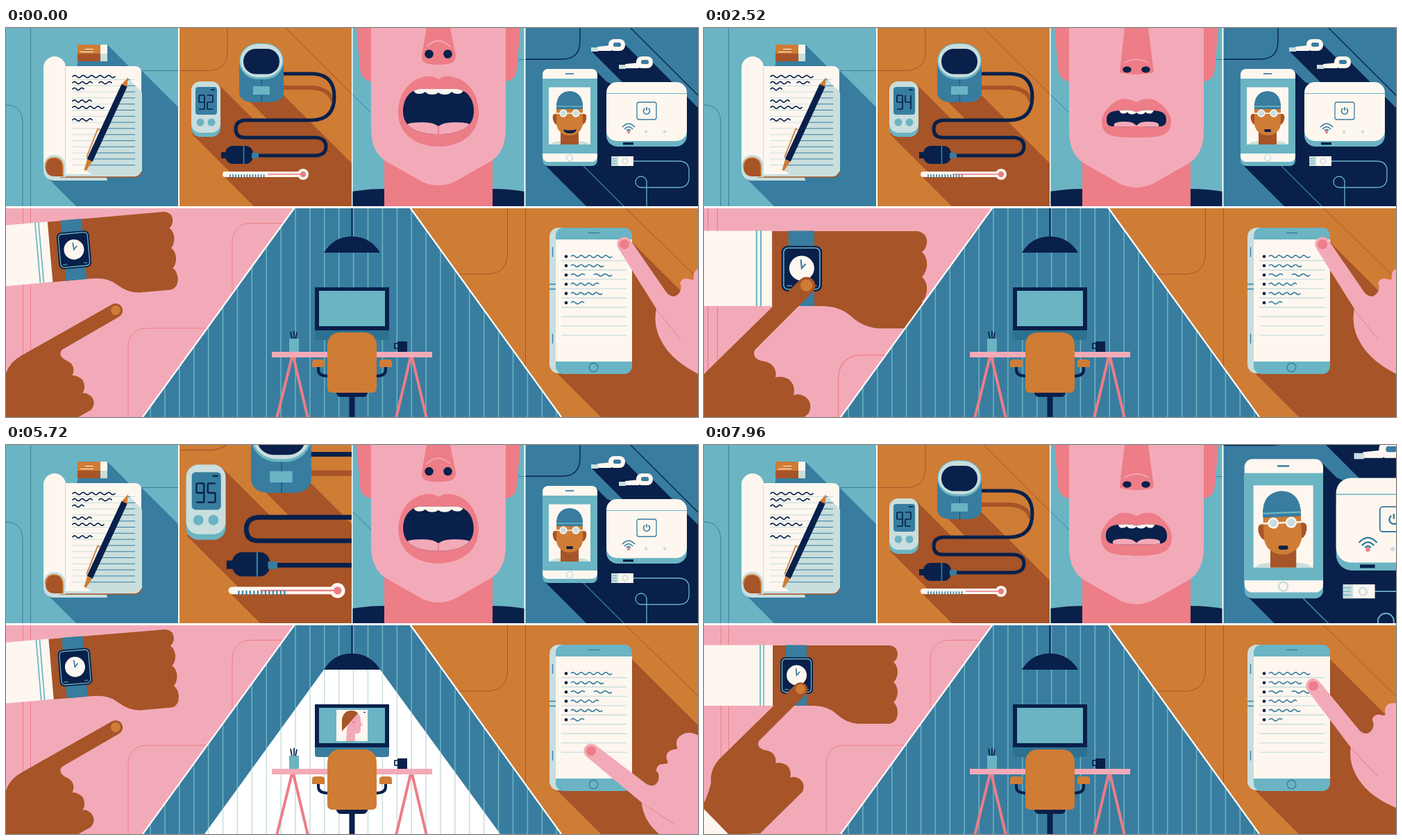
An HTML page that plays this animation: 997x561 px, repeating every 8000 ms.

```html
<!DOCTYPE html>
<html lang="en">
<head>
<meta charset="utf-8">
<title>Health panels</title>
<style>
html,body{margin:0;width:100%;height:100%;overflow:hidden;background:#fff}
svg{display:block;width:100vw;height:100vh}
.navy{fill:#08204a}.teal{fill:#6bb4c3}.blue{fill:#387d9f}.orange{fill:#cf7c35}.brown{fill:#a65428}
.pink{fill:#f3aab8}.rose{fill:#ed7d87}.cream{fill:#fdf7f0}.pale{fill:#c9dedd}
.line{fill:none;stroke-width:1}
.s-navy{stroke:#08204a}.s-teal{stroke:#6bb4c3}.s-blue{stroke:#387d9f}.s-brown{stroke:#a65428}
.s-orange{stroke:#cf7c35}.s-rose{stroke:#ed7d87}.s-pale{stroke:#c9dedd}.s-cream{stroke:#fdf7f0}.s-pink{stroke:#f3aab8}
.round{stroke-linecap:round;stroke-linejoin:round}
.w2{stroke-width:1.7}
</style>
</head>
<body>
<svg viewBox="0 0 997 561" preserveAspectRatio="none">
<defs>
  <clipPath id="c1"><path d="M0 0H248V257H0Z"/></clipPath>
  <clipPath id="c2"><path d="M250 0H498V257H250Z"/></clipPath>
  <clipPath id="c3"><path d="M499.500 0H746.500V257H499.500Z"/></clipPath>
  <clipPath id="c4"><path d="M748.500 0H997V257H748.500Z"/></clipPath>
  <clipPath id="c5"><path d="M0 260H416L197 561H0Z"/></clipPath>
  <clipPath id="c6"><path d="M416 260H582L800 561H197Z"/></clipPath>
  <clipPath id="c7"><path d="M582 260H997V561H800Z"/></clipPath>
  <clipPath id="penShade"><path id="penShadePath" d="M176 72L196 93V206L190 213H126L113 204Z"/></clipPath>
  <clipPath id="cone"><path d="M458 324H539L712 561H286Z"/></clipPath>
  <clipPath id="screen"><path d="M792 305H902V481H792Z"/></clipPath>
  <clipPath id="mouthClip"><path id="mouthClipPath"/></clipPath>
  <g id="bud">
    <path class="cream" d="M852 27L872 25V33H852Z"/><path class="pale" d="M843 28H853V34H843Z"/>
    <rect class="cream" x="868" y="16" width="24" height="17" rx="8"/>
    <rect class="blue" x="875" y="21" width="11" height="6" rx="2.500"/>
  </g>
</defs>

<!-- notepad -->
<g clip-path="url(#c1)">
  <path class="teal" d="M0 0H248V257H0Z"/>
  <path class="line s-blue" d="M35.500 0V257M0 111Q24 111 24 137V257M190 61.500H248"/>
  <path class="blue" d="M104 48L146 24L178 56L195 61L248 114V257H101L60 216Z"/>
  <path class="pale" d="M54 198H140L146 220H68Q54 218 54 204Z"/>
  <path class="pale" d="M86 60H195V204Q195 215 184 215H80Z"/>
  <path class="cream" d="M54 57A16 16 0 0 1 86 57V214H70L54 200Z"/>
  <path class="cream" d="M86 55H187Q195 56 195 65V202Q195 210 187 211H86Z"/>
  <path class="line s-pale" d="M85.500 57V212"/>
  <path class="line s-brown w2" d="M78 215H186Q195 214 195 205"/>
  <path class="pale" d="M54 202Q54 183 70 183Q86 184 86 202V215H70Q55 215 54 202Z"/>
  <path class="brown" d="M57 202Q57 187 70 187Q82 188 82 202V214H70Q58 214 57 202Z"/>
  <path class="line s-orange w2" d="M57 201Q57 187 70 187Q82 188 82 202V214"/>
  <path id="padLines" class="line s-pale"/>
  <use href="#penShadePath" class="pale"/>
  <g clip-path="url(#penShade)"><path id="padLinesDark" class="line s-blue"/></g>
  <path id="padText" class="line s-navy w2 round"/>
  <g transform="translate(176 71) rotate(24.800)">
    <path class="orange" d="M0 0L4.500 14H-4.500Z"/><path class="navy" d="M-4.500 13H4.500V132H-4.500Z"/>
    <path class="orange" d="M-4 132H4L1.500 148H-1.500Z"/>
    <path class="line s-orange w2" d="M-4.500 86H-8.500L-6 130"/>
  </g>
  <path class="orange" d="M103 24H136V37H103Z"/><path class="brown" d="M103 37H136V48H103Z"/>
  <path class="cream" d="M136 24H146V37H136Z"/><path class="pale" d="M136 37H146V48H136Z"/>
  <path class="line s-cream" d="M114 30.500H126M107 34.500H126"/>
</g>

<!-- medical devices -->
<g clip-path="url(#c2)"><path class="orange" d="M250 0H498V257H250Z"/>
<g id="cam2">
  <path class="line s-brown" d="M230 61.500H291Q319 61 319 33V-40M403 0L498 95"/>
  <path class="brown" d="M268 153L305 80L358 133H378L347 102L400 97L510 207V270H370L312 212L325 210Z"/>
  <path class="line s-brown" style="stroke-width:6" d="M400 86H442Q466 88 471 106"/>
  <path class="line s-navy" style="stroke-width:5" d="M399 66H443Q473 68 473 99Q473 132 441 133H344Q331 134 331 145.500Q331 158 344 158H446Q461 159 461 171Q461 183 446 184H362"/>
  <rect class="teal" x="267" y="84" width="42" height="73" rx="13"/>
  <rect class="pale" x="267" y="77" width="42" height="74" rx="13"/>
  <rect class="blue" x="273" y="85" width="31" height="40" rx="4"/>
  <path class="line s-navy w2" d="M295 89H301"/>
  <path id="digits" class="line s-navy w2"/>
  <circle class="teal" cx="280" cy="136" r="5.500"/><circle class="teal" cx="296" cy="136" r="5.500"/>
  <path class="blue" d="M336 45V94Q338 106 354 107H382Q398 106 400 94V45Z"/>
  <rect class="teal" x="336" y="22" width="64" height="52" rx="27"/>
  <rect class="pale" x="337.500" y="23" width="61" height="48" rx="26"/>
  <rect class="navy" x="342" y="30" width="52" height="36.500" rx="18"/>
  <path class="line s-navy" d="M368.500 74V107" opacity=".5"/>
  <path class="teal" d="M356 84H380V96H356Z"/>
  <path class="navy" d="M310 179H318V188H310Z"/><rect class="navy" x="316" y="170" width="40" height="26" rx="11"/>
  <path class="blue" d="M354 180H364V188H354Z"/><path class="line s-blue w2" d="M342.500 170V196"/>
  <path class="line s-cream round" style="stroke-width:8" d="M316 211H428"/>
  <circle class="cream" cx="428" cy="211" r="8"/>
  <path id="mercury" class="line s-rose w2"/><circle class="rose" cx="428" cy="211" r="4.200"/>
  <path id="ticks" class="line s-blue" style="stroke-width:1.600"/>
</g></g>

<!-- face -->
<g clip-path="url(#c3)">
  <path class="teal" d="M498 0H748V257H498Z"/>
  <path class="line s-blue" d="M499 96L527 123M738 45.500H748"/>
  <path class="navy" d="M498 236Q520 232 546 232H701Q726 232 748 236V257H498Z"/>
  <path class="rose" d="M545 170H701V257H545Z"/>
  <path class="rose" d="M505 0L510 58Q511 75 526 77H720Q735 75 736 58L741 0Z"/>
  <path id="jaw" class="pink"/>
  <path id="nose" class="rose"/>
  <path id="bridge" class="line s-pink w2"/>
  <ellipse id="nostrilL" class="navy" cx="609.500" rx="6.300"/><ellipse id="nostrilR" class="navy" cx="636.500" rx="6.300"/>
  <path id="lips" class="rose"/><path id="inner" class="navy"/>
  <g clip-path="url(#mouthClip)">
    <g id="tongue"><path class="pink" d="M-46 45V4Q-44 0 -22 0Q-6 0 0 6Q6 0 22 0Q44 0 46 4V45Z"/><path class="line s-rose w2" d="M0 5V20"/></g>
    <path id="teeth" class="cream" d="M-36 -5H36V2Q34 7 28 7Q22 7 19 4Q16 8 9 8Q3 8 0 5Q-3 8 -9 8Q-16 8 -19 4Q-22 7 -28 7Q-34 7 -36 2Z"/>
  </g>
</g>

<!-- connected gadgets -->
<g clip-path="url(#c4)"><path class="blue" d="M748 0H997V257H748Z"/>
<g id="cam4">
  <path class="line s-navy" style="stroke-width:1.300" d="M740 45H801Q827 45 827 19V-40M900 0L1010 110"/>
  <path class="navy" d="M776 197L850 62L866 78L902 92L843 33L892 24L911 43L932 50L1010 128V270H849Z"/>
  <path class="line s-blue" style="stroke-width:1.300" d="M832 199L890 257"/>
  <path class="line s-teal" style="stroke-width:1.300" d="M904 192H969Q984 192 984 206V216Q984 230 969 230H915A8 8 0 1 1 923 222V270"/>
  <use href="#bud"/><use href="#bud" x="40" y="25"/>
  <rect class="teal" x="773" y="68" width="79" height="131" rx="8"/>
  <rect class="cream" x="773" y="59" width="79" height="134" rx="8"/>
  <path class="teal" d="M773 73H852V181H773Z"/><path class="cream" d="M782 85.500H842V168H782Z"/>
  <path class="line s-blue w2" d="M806 66H818"/><circle class="line s-pale w2" cx="812" cy="187" r="4.500"/>
  <path class="pale" d="M784 168Q786 164 800 163H825Q839 164 840 168Z"/>
  <path class="brown" d="M799 145H825V168H799Z"/>
  <g id="head">
    <path class="brown" d="M794 124Q786 122 788 132Q790 140 796 140ZM830 124Q838 122 836 132Q834 140 828 140Z"/>
    <path class="orange" d="M793 110H831V139Q828 154 812 155Q796 154 793 139Z"/>
    <path class="blue" d="M793 117V110Q795 92 812 91Q829 92 831 110V117Z"/>
    <path class="line s-teal w2" d="M793 113H831"/>
    <path class="line s-cream w2" d="M793 123H831"/>
    <circle class="pale s-cream w2" cx="803" cy="123" r="4.800"/><circle class="pale s-cream w2" cx="821" cy="123" r="4.800"/>
    <path id="portraitMouth" class="navy"/>
  </g>
  <rect class="teal" x="865" y="88" width="116" height="83" rx="16"/>
  <rect class="cream" x="865" y="78" width="116" height="85" rx="15"/>
  <path class="line s-teal" d="M865 94.500H981"/>
  <rect class="line s-blue" style="stroke-width:1.300" x="909" y="107" width="28" height="25" rx="3"/>
  <path class="line s-blue w2" d="M920.500 116A4.500 4.500 0 1 0 925.500 116M923 114V119"/>
  <path class="line s-blue w2" d="M888 143Q897 133 906 143M891 146Q897 139 903 146M894 148Q897 145 900 148"/>
  <circle class="rose" cx="897" cy="150" r="2.200"/><circle class="pale" cx="922" cy="149.500" r="2.200"/><circle class="pale" cx="949" cy="149.500" r="2.200"/>
  <path class="navy" d="M889 165H904V168.500H889Z"/>
  <path class="cream" d="M872 185H904V199H872Z"/><path class="pale" d="M872 185H882V199H872Z"/>
  <path class="line s-teal" d="M872 188.500H880M872 192H880M872 195.500H880"/><circle class="line s-pale w2" cx="892" cy="192" r="3.800"/>
</g></g>

<!-- watch -->
<g clip-path="url(#c5)"><path class="pink" d="M0 259H420V561H0Z"/>
<g id="cam5">
  <path class="line s-rose" d="M24.500 240V570M35.500 240V570M420 281.500H356Q326 281 326 311V460M176 570V462Q176 433 205 433H330"/>
  <g id="arm">
    <path class="brown" d="M90 289H268Q279 291 279 302Q278 310 273 313Q279 318 279 328Q278 338 273 342Q279 347 279 357Q278 367 273 371Q279 376 279 387Q278 400 268 402H222Q205 401 191 388Q178 376 156 376H90Z"/>
    <path class="cream" d="M-80 288.500H99V376H-80Z"/><path class="line s-teal w2" d="M81 288V376M86 288V376"/>
    <path class="blue" d="M118 288.500H148V376H118Z"/>
    <rect class="navy" x="110" y="306" width="47" height="53" rx="7"/>
    <rect class="line s-teal" style="stroke-width:1.300" x="112.500" y="308.500" width="42" height="48" rx="5"/>
    <path class="line s-teal" d="M116 352.500H122M146 352.500H151"/>
    <circle class="cream" cx="133.500" cy="332" r="14.500"/><path class="line s-blue w2" d="M132.500 322L133.500 332L138 327"/>
  </g>
  <g id="pointer">
    <path class="cream" d="M-5 520L37 563L-40 640L-90 580Z"/>
    <path class="brown" d="M132 345L25 450Q8 466 10 488Q6 505 -3 522L37 563L80 561L142 500Q147 488 137 481Q129 477 124 480Q127 468 118 461Q110 457 103 459Q105 449 97 443Q91 440 87 440Q75 436 79 427L146 360A10 10 0 0 0 132 345ZM37 562L80 560L60 600Z"/>
    <circle class="orange" cx="139" cy="352" r="7"/>
  </g>
</g></g>

<!-- desk -->
<g clip-path="url(#c6)">
  <path class="blue" d="M190 259H810V561H190Z"/>
  <path id="stripes" class="line s-teal" style="stroke-width:1.500"/>
  <g id="light" clip-path="url(#cone)"><path fill="#fff" d="M280 320H720V561H280Z"/><path id="litStripes" class="line s-pale" style="stroke-width:1.500"/></g>
  <path class="navy" d="M497.500 259H499.500V302H497.500ZM458 324Q472 301 498 300.500Q525 301 539 324Z"/>
  <path id="stand" d="M445 432H552V446Q552 450 548 450H449Q445 450 445 446Z"/>
  <path class="navy" d="M445 374H552V436H445Z"/><path class="teal" d="M451 379H546V430H451Z"/>
  <g id="profile">
    <path class="cream" d="M476 382H521V427H476Z"/>
    <path class="pink" d="M492 398L505 385Q511 389 511 398L514 405H511V413Q509 417 503 416V427H490Z"/>
    <path class="brown" d="M484 413V396Q486 383 498 383Q504 383 507 387Z"/>
    <circle class="rose" cx="501" cy="400" r="1.800"/><path class="line s-navy" d="M515 385.500H518"/>
  </g>
  <path class="line s-rose" style="stroke-width:4" d="M412 474L390 563M414 474L435 563M583 474L562 563M585 474L606 563"/>
  <path class="pink" d="M383 467H614V475H383Z"/>
  <path class="line s-navy w2" d="M412 449L410 438M415 449V437M417 449L419 439"/><path class="teal" d="M408 448H422V467H408Z"/>
  <path class="navy" d="M564 452H578V467H564Z"/><path class="line s-navy w2" d="M565 455H560V462H565"/>
  <path class="line s-navy" style="stroke-width:4" d="M450 487V493Q450 502 464 502M547 487V493Q547 502 533 502"/>
  <path class="navy" d="M476 524H521V527Q519 532 515 532H482Q478 532 476 527ZM494.500 530H502.500V561H494.500Z"/>
  <path class="orange" d="M463 459Q463 439 483 439H514Q534 439 534 459V519Q534 526 527 526H470Q463 526 463 519ZM441 482Q441 478 446 478H454Q459 478 459 482V489H441ZM538 482Q538 478 543 478H551Q556 478 556 482V489H538Z"/>
</g>

<!-- phone list -->
<g clip-path="url(#c7)">
  <path class="orange" d="M580 259H997V561H580Z"/>
  <path class="line s-brown" d="M722.500 259V325Q722 355 692 355H640M748.500 259V490M893 260L997 362"/>
  <path class="brown" d="M788 492L898 305L997 404V561H857Z"/>
  <rect class="pale" x="783" y="288" width="60" height="210" rx="13"/>
  <rect class="teal" x="792" y="288" width="110" height="211" rx="11"/>
  <path class="cream" d="M792 305H902V481H792Z"/>
  <path class="line s-blue" style="stroke-width:1.400" d="M839 295.500H855M787.500 316V330M787.500 441V455M783 369.500H792M783 376.500H792"/>
  <circle class="line s-blue" style="stroke-width:1.400" cx="846.500" cy="489.500" r="6.300"/>
  <g clip-path="url(#screen)"><g id="oldPage"></g><g id="newPage"></g></g>
  <g id="swiper">
    <path class="pink" d="M899 305L952 382Q962 392 970 382Q975 374 971 368Q975 359 984 362Q990 364 991 362Q989 350 998 347Q1006 346 1010 348Q1010 334 1020 331Q1032 327 1042 336L1140 420V620L1010 505Q965 485 948 458Q931 432 937 405L883 319A10.500 10.500 0 0 1 899 305Z"/>
    <path class="line s-rose" d="M938 407L972 450"/><circle class="rose" cx="891" cy="312" r="7"/>
  </g>
</g>
<path fill="none" stroke="#fff" stroke-width="2.200" d="M416.500 258L197 561M581.500 258L800 561"/>
</svg>
<script>
const $ = id => document.getElementById(id);
const set = (id, name, value) => $(id).setAttribute(name, value);
const clamp = v => Math.min(1, Math.max(0, v));
const mix = (a, b, k) => a + (b - a) * k;
const cubic = k => k < .5 ? 4 * k ** 3 : 1 - 4 * (1 - k) ** 3;
const sine = k => (1 - Math.cos(Math.PI * k)) / 2;
const ramp = (t, a, b, ease = cubic) => ease(clamp((t - a) / (b - a)));
const range = n => [...Array(n).keys()];

// piecewise linear track of [time, value] pairs
function track(t, ...keys) {
  const i = keys.findIndex(k => k[0] > t);
  if (i < 0) return keys[keys.length - 1][1];
  if (!i) return keys[0][1];
  const [a, b] = [keys[i - 1], keys[i]];
  return mix(a[1], b[1], (t - a[0]) / (b[0] - a[0]));
}

// wavy handwriting of width w, about 6 px per half wave
function wave(x, y, w) {
  const count = Math.max(2, Math.round(w / 6)), half = w / count;
  return `M${x} ${y}q${half / 2} -3.200 ${half} 0` + `t${half} 0`.repeat(count - 1);
}

function zoom(id, x, y, scale) {
  set(id, 'transform', `translate(${x} ${y}) scale(${scale}) translate(${-x} ${-y})`);
}

// fixed repeats
const padLines = range(15).map(i => `M95 ${74.500 + 8.800 * i}H186`).join('');
set('padLines', 'd', padLines);
set('padLinesDark', 'd', padLines);
set('padText', 'd', [[96, 70, 61], [96, 79, 28], [134, 79, 18], [96, 88, 16], [96, 105.500, 27], [96, 114.500, 45], [96, 132.500, 28]].map(w => wave(...w)).join(''));
set('ticks', 'd', range(13).map(i => `M${323 + 4.050 * i} 211V215.500`).join(''));
const stripes = range(30).map(i => `M${208 + 20.900 * i} 259V561`).join('');
set('stripes', 'd', stripes);
set('litStripes', 'd', stripes);

// the list page, used twice while it scrolls
const rows = [[[814, 59]], [[814, 47]], [[814, 20], [847, 26]], [[814, 40]], [[814, 45]], [[814, 19]]];
const rules = range(9).map(i => `M800 ${335.500 + 13.450 * i}H894`).join('');
const page = `<path class="line s-pale" style="stroke-width:1.400" d="${rules}"/>` + rows.map((parts, i) => {
  const y = 329.500 + 13.350 * i;
  return `<circle class="navy" cx="807" cy="${y}" r="2.300"/>` +
    parts.map(([x, w]) => `<path class="line s-blue w2" d="${wave(x, y, w)}"/>`).join('');
}).join('');
$('oldPage').innerHTML = $('newPage').innerHTML = page;
const newRows = [];
for (const el of $('newPage').children) {
  if (el.tagName === 'circle') newRows.push({ dot: el, waves: [] });
  else if (newRows.length) newRows[newRows.length - 1].waves.push(el);
}

// seven-segment digits: top, upper right, lower right, bottom, lower left, upper left, middle
const segments = ['M0 0h8', 'M8 0v10', 'M8 10v10', 'M0 20h8', 'M0 10v10', 'M0 0v10', 'M0 10h8'];
const lit = { 2: '01643', 3: '01623', 4: '5612', 5: '05623', 9: '056123' };
function digit(n, x, y) {
  return [...lit[n]].map(s => segments[s].replace(/M(\d+) (\d+)/, (_, a, b) => `M${x + +a} ${y + +b}`)).join('');
}

function drawReading(t) {
  const p = t % 4000;
  const value = p < 900 ? 2 : p < 1250 ? 3 : p < 1600 ? 4 : p < 2200 ? 5 : p < 2550 ? 4 : p < 2950 ? 3 : 2;
  set('digits', 'd', digit(9, 278, 97) + digit(value, 290, 97));
  const end = track(p, [700, 377], [1700, 346], [2100, 346], [3150, 377]);
  set('mercury', 'd', `M${end} 211H428`);
}

// left half of a mouth outline, mirrored around x = 623
function mouthPath(closed, open, k) {
  const v = closed.map((c, i) => mix(c, open[i], k));
  const p = i => `${v[i]} ${v[i + 1]} `;
  const m = i => `${1246 - v[i]} ${v[i + 1]} `;
  return `M${p(0)}C${p(2)}${p(4)}${p(6)}Q${p(8)}${p(10)}Q${m(8)}${m(6)}C${m(4)}${m(2)}${m(0)}C${m(12)}${m(14)}${p(16)}C${p(14)}${p(12)}${p(0)}Z`;
}
const lipsClosed = [573, 134, 573, 122, 590, 103, 604, 102, 614, 102, 623, 107, 573, 155, 586, 158, 623, 158];
const lipsOpen = [565, 122, 565, 96, 580, 75, 601, 71, 613, 67, 623, 74, 565, 152, 590, 171, 623, 171];
const innerClosed = [580, 132, 580, 122, 588, 119, 600, 119, 612, 117, 623, 121, 580, 145, 588, 142, 623, 142];
const innerOpen = [572, 120, 572, 102, 582, 89, 597, 88, 610, 88, 623, 88, 572, 143, 591, 153, 623, 153];

function drawFace(t) {
  const p = t % 5000;
  const k = 1 - ramp(p, 600, 1250) + ramp(p, 2750, 3400);
  const y = 230 - 3 * k;
  set('jaw', 'd', `M526 0V${y - 82}Q526 ${y - 47} 549 ${y - 34}L600 ${y - 5}Q623 ${y + 5} 646 ${y - 5}L697 ${y - 34}Q720 ${y - 47} 720 ${y - 82}V0Z`);
  const n = mix(67, 53, k), c = mix(4, 14, k);
  set('nose', 'd', `M606 0H640L648 ${n - c}Q648 ${n - 2} 636 ${n - 1}Q623 ${n + 1} 610 ${n - 1}Q598 ${n - 2} 599 ${n - c}Z`);
  const b = mix(50, 27, k);
  set('bridge', 'd', `M606 ${b}Q623 ${b - mix(9, 17, k)} 640 ${b}`);
  for (const id of ['nostrilL', 'nostrilR']) {
    set(id, 'cy', mix(60, 37.500, k));
    set(id, 'ry', mix(4.500, 6.300, k));
  }
  set('lips', 'd', mouthPath(lipsClosed, lipsOpen, k));
  const inner = mouthPath(innerClosed, innerOpen, k);
  set('inner', 'd', inner);
  set('mouthClipPath', 'd', inner);
  set('tongue', 'transform', `translate(623 ${mix(135, 136, k)}) scale(${mix(.7, 1, k)} 1)`);
  set('teeth', 'transform', `translate(623 ${mix(118, 88, k)}) scale(${mix(.68, 1, k)} ${mix(.8, 1, k)})`);
}

function drawPortrait(t) {
  const p = t % 5000, smile = p > 4200 || p < 450;
  set('portraitMouth', 'd', smile ? 'M803 146Q812 149 822 146Q821 152 812 152Q804 152 803 146Z'
    : 'M808 146H816Q818 148 816 150H809Q806 149 808 146Z');
  const tilt = p > 2500 && p < 4200 ? Math.sin((p - 2500) / 1700 * Math.PI) : 0;
  set('head', 'transform', `rotate(${-3 * tilt} 812 150)`);
}

function drawWatch(t) {
  const p = t % 5000;
  const raised = 1 - ramp(p, 560, 1300) + ramp(p, 3420, 4300);
  set('arm', 'transform', `translate(${-35.500 * raised} ${-12.500 * raised}) rotate(${-5 * raised} 133.500 332.500)`);
  const away = 1 - ramp(p, 680, 1320) + ramp(p, 3240, 4080);
  set('pointer', 'transform', `translate(${19 * away} ${55 * away}) rotate(${15 * away} 139 352)`);
}

function drawList(t) {
  const p = t % 2500;
  const drop = ramp(p, 260, 900, sine);
  const lift = ramp(p, 1050, 2060, k => 1 - (1 - k) ** 2);
  const dy = 158 * (drop - lift);
  const bow = Math.sin(Math.PI * lift);
  set('swiper', 'transform', `translate(${-.37 * dy - 13 * bow} ${dy}) rotate(${-.14 * dy - 2.700 * bow} 891 312)`);
  const scroll = 155 * track(p, [1040, 0], [1250, .38], [1480, .61], [1720, .745], [2060, .95], [2250, 1]);
  set('oldPage', 'transform', `translate(0 ${-scroll})`);
  set('newPage', 'transform', `translate(0 ${155 - scroll})`);
  newRows.forEach(({ dot, waves }, i) => {
    const shown = Math.max(0, (p - 1800 - 62 * i) * .125);
    dot.setAttribute('r', 2.300 * clamp(shown / 8));
    for (const w of waves) {
      w.setAttribute('stroke-dasharray', `${shown * 1.100} 999`);
      w.style.visibility = shown ? 'visible' : 'hidden';
    }
  });
}

function drawDesk(t) {
  const on = t >= 3000 && t < 6000;
  $('light').style.display = $('profile').style.display = on ? '' : 'none';
  set('stand', 'fill', on ? '#387d9f' : '#2d7191');
}

function frame(now) {
  const t = now % 8000;
  zoom('cam2', 288, 214, 1 + .355 * (ramp(t, 3222, 4422) - ramp(t, 6225, 7425)));
  zoom('cam4', 760, 148, 1 + .435 * ramp(t, 6225, 7425));
  zoom('cam5', 103, 272, 1 + .24 * (ramp(t, 222, 1422) - ramp(t, 3080, 4280)));
  drawReading(t);
  drawFace(t);
  drawPortrait(t);
  drawWatch(t);
  drawList(t);
  drawDesk(t);
  requestAnimationFrame(frame);
}
frame(0);
</script>
</body>
</html>
```
